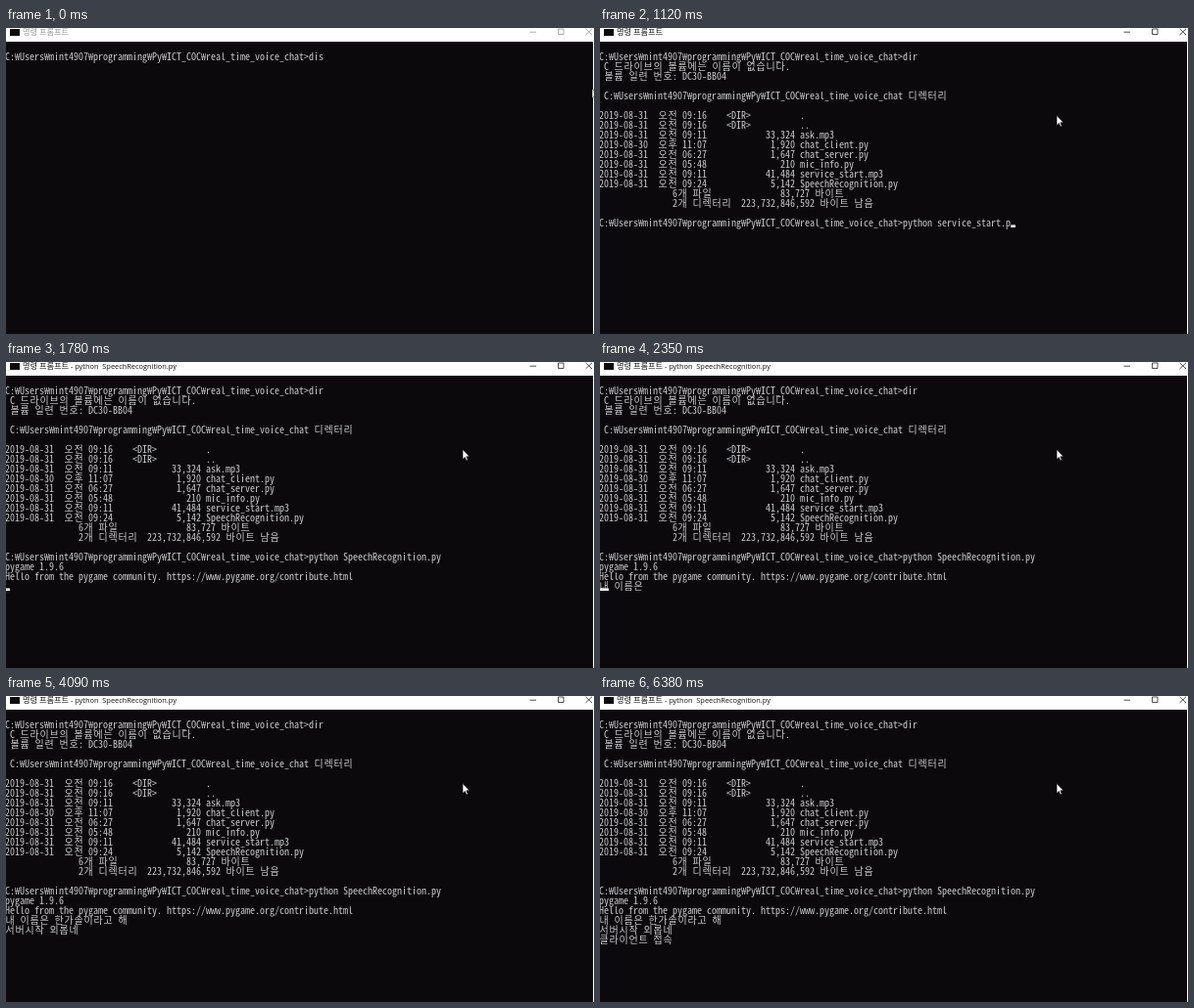
These frames come from a looping animation (600 by 313 pixels, 6.41 s). An HTML page with a canvas:

```html
<!DOCTYPE html>
<html lang="ko">
<head>
<meta charset="utf-8">
<title>Terminal</title>
<style>
html, body { margin: 0; width: 100%; height: 100%; overflow: hidden; background: #0b090c; }
canvas { display: block; }
</style>
</head>
<body>
<canvas id="stage" width="600" height="313"></canvas>
<script>
const ctx = document.getElementById('stage').getContext('2d');
const LOOP = 6410, COL = 5, ROW = 10, LEFT = -1, BASE = 33;
const MONO = '300 10px "Noto Sans Mono CJK KR", "Noto Sans CJK KR", "Noto Sans Mono", monospace';
const HANGUL = '8.2px "Noto Sans CJK KR", "Noto Sans CJK", sans-serif';
const LATIN = '7.4px "Open Sans", "Noto Sans", sans-serif';

const path = 'C:₩Users₩mint4907₩programming₩Py₩ICT_COC₩real_time_voice_chat';
const prompt = path + '>';

const entry = (day, time, size, name) =>
  `2019-08-${day}  ${time}    ` + (size ? size.padStart(14) : '<DIR>'.padEnd(14)) + ' ' + name;

const listing = [
  ' C 드라이브의 볼륨에는 이름이 없습니다.',
  ' 볼륨 일련 번호: DC30-BB04',
  '',
  ` ${path} 디렉터리`,
  '',
  entry(31, '오전 09:16', '', '.'),
  entry(31, '오전 09:16', '', '..'),
  entry(31, '오전 09:11', '33,324', 'ask.mp3'),
  entry(30, '오후 11:07', '1,920', 'chat_client.py'),
  entry(31, '오전 06:27', '1,647', 'chat_server.py'),
  entry(31, '오전 05:48', '210', 'mic_info.py'),
  entry(31, '오전 09:11', '41,484', 'service_start.mp3'),
  entry(31, '오전 09:24', '5,142', 'SpeechRecognition.py'),
  ' '.repeat(15) + '6개 파일' + ' '.repeat(14) + '83,727 바이트',
  ' '.repeat(15) + '2개 디렉터리  223,732,846,592 바이트 남음',
  ''
];

// Latest value of a [time, value] list
const at = (steps, t) => steps.reduce((v, s) => (t >= s[0] ? s[1] : v), steps[0][1]);

const firstCommand = [[0, 'dis'], [280, 'di'], [330, 'dir']];

const command = [[0, '']];
[...'python '].forEach((c, i) => command.push([430 + i * 60, 'python '.slice(0, i + 1)]));
[[870, 's'], [910, 'service_start.mp3'], [950, 'service_start.mp'], [990, 'service_start.m'],
 [1030, 'service_start.'], [1120, 'service_start.p'], [1140, 'service_start.py']]
  .forEach(([t, s]) => command.push([t, 'python ' + s]));
for (let i = 1; i <= 8; i++)
  command.push([1140 + i * 34, 'python ' + 'service_start.py'.slice(0, 16 - 2 * i)]);
command.push([1450, 'python s'], [1490, 'python SpeechRecognition.py']);

const speech = [
  [[0, ''], [2330, '내 이름은'], [2790, '내 이름은 한가솔이라고 해']],
  [[0, ''], [3020, ' 근데'], [3310, ' 근데 나 외롭네'], [3500, '서버시작 외롭네']],
  [[0, ''], [4250, '클라이언트 접속']]
];

const cells = c => (c >= '\u3000' ? 2 : 1);

function drawLine(text, row) {
  let col = 0;
  for (const c of text) {
    const n = cells(c);
    if (c !== ' ') ctx.fillText(c, LEFT + (col + n / 2) * COL, BASE + row * ROW);
    col += n;
  }
}

function drawCursor(col, row, n = 1) {
  ctx.fillStyle = '#f2f2f2';
  ctx.fillRect(LEFT + col * COL + 0.2, BASE + row * ROW - 1.6, n * COL - 0.3, 2.6);
}

function drawPointer(x, y) {
  const pts = [0, 0, 0, 10, 2.3, 7.9, 3.8, 11.4, 5.3, 10.7, 3.8, 7.3, 7, 7.2];
  ctx.beginPath();
  for (let i = 0; i < pts.length; i += 2) ctx.lineTo(x + pts[i], y + pts[i + 1]);
  ctx.closePath();
  ctx.fillStyle = '#fff';
  ctx.strokeStyle = '#000';
  ctx.lineWidth = 0.6;
  ctx.fill();
  ctx.stroke();
}

function drawWindow(t) {
  ctx.fillStyle = '#0b090c';
  ctx.fillRect(0, 0, 600, 313);
  ctx.fillStyle = '#fff';
  ctx.fillRect(0, 0, 600, 14);
  ctx.fillRect(599, 14, 1, 299);

  const active = t >= 240;
  ctx.fillStyle = '#0b090c';
  ctx.fillRect(4, 1, 10, 7);
  ctx.fillStyle = active ? '#111' : '#999';
  ctx.textAlign = 'left';
  ctx.font = HANGUL;
  ctx.fillText('명령 프롬프트', 17, 6.7);
  if (t >= 1630) {
    ctx.font = LATIN;
    ctx.fillText(' - python\u00a0 SpeechRecognition.py', 64, 6.7);
  }
  ctx.strokeStyle = active ? '#222' : '#999';
  ctx.lineWidth = 0.8;
  ctx.beginPath();
  ctx.moveTo(534.5, 4.2); ctx.lineTo(541, 4.2);
  ctx.rect(563.5, 1, 5.5, 5.5);
  ctx.moveTo(591.5, 0.8); ctx.lineTo(598, 7);
  ctx.moveTo(598, 0.8); ctx.lineTo(591.5, 7);
  ctx.stroke();
}

function drawConsole(t) {
  const lines = [prompt + at(firstCommand, t)];
  if (t >= 370) lines.push(...listing, prompt + at(command, t));
  if (t >= 1690) {
    lines.push('pygame 1.9.6',
      'Hello from the pygame community. https://www.pygame.org/contribute.html');
    speech.forEach(s => lines.push(at(s, t)));
  }
  ctx.font = MONO;
  ctx.textAlign = 'center';
  ctx.fillStyle = '#ccc';
  lines.forEach(drawLine);
}

function cursorOn(t) {
  if (t < 240) return false;
  if (t < 1690) return true;
  if (t < 2310) return Math.floor((t - 1690) / 88.4) % 2 === 1;
  if (t < 3310) return t < 2560 || (t >= 2790 && t < 3020);
  if (t < 3500) return t < 3360;
  if (t < 4250) return Math.floor(Math.min(t - 3500, 615) / 76.2) % 2 === 0;
  return Math.floor((t - 4250) / 84.7) % 2 === 0;
}

function cursor(t) {
  if (!cursorOn(t)) return;
  if (t < 370) drawCursor(prompt.length + at(firstCommand, t).length, 0);
  else if (t < 1600) drawCursor(prompt.length + at(command, t).length, 17);
  else if (t < 1690) drawCursor(0, 18);
  else if (t < 3020) drawCursor(0, 20, t >= 2330 ? 2 : 1);
  else if (t < 3500) drawCursor(0, 21);
  else if (t < 4250) drawCursor(0, 22);
  else drawCursor(0, 23);
}

function pointer(t) {
  if (t < 20) return drawPointer(598, 62);
  if (t < 160) return;
  const k = Math.min(1, Math.floor((t - 160) / 42 + 1) / 5);
  const e = 1 - (1 - k) ** 2;
  drawPointer(598 - 132 * e, 66 + 23.5 * e);
}

function tick(now) {
  const t = now % LOOP;
  drawWindow(t);
  drawConsole(t);
  cursor(t);
  pointer(t);
  requestAnimationFrame(tick);
}
requestAnimationFrame(tick);
</script>
</body>
</html>
```
